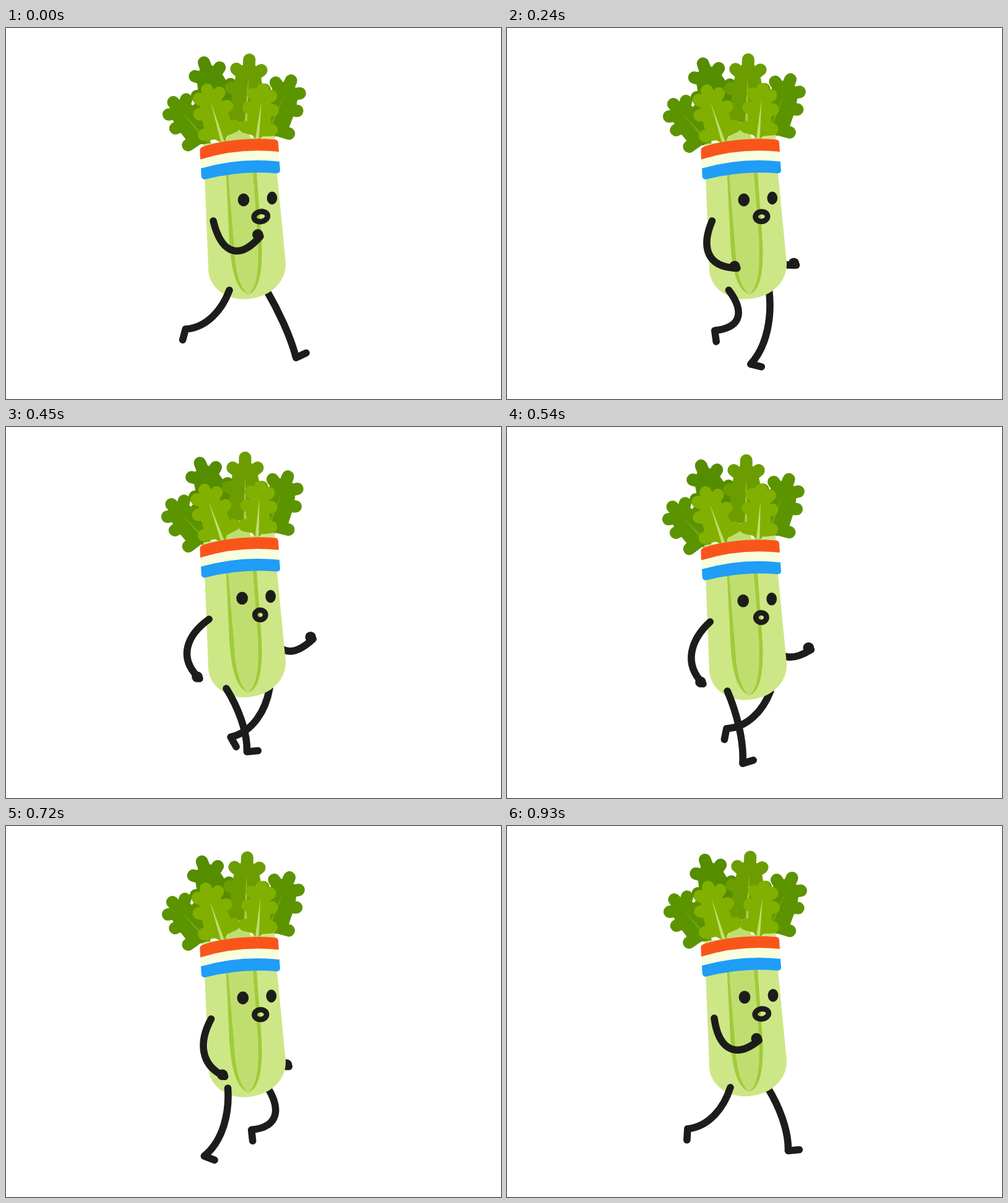
Write an HTML page that moves like this. It is 800 px wide and 600 px high and loops after 0.96 s.

```html
<!DOCTYPE html>
<html lang="en">
<head>
<meta charset="utf-8">
<title>Walking celery</title>
<style>
  html, body { margin: 0; width: 100%; height: 100%; overflow: hidden; background: #fff; }
  svg { display: block; width: 100%; height: 100%; }
  .limb { fill: none; stroke: #1c1d1a; stroke-width: 11.6; stroke-linecap: round; stroke-linejoin: round; }
  .lobes { stroke-width: 20; stroke-linecap: round; }
</style>
</head>
<body>
<svg viewBox="0 0 800 600">
  <g id="far"></g>
  <g id="body">
    <g id="backLeaves"></g>
    <path fill="#cde786" d="M319 188L434 172 438 235 452 380C453 413 424 438 384 438.5 350 438 327 415 327 390Z"/>
    <path fill="#a0cb3a" d="M353 180L361 345C364 392 371 422 391 431 411 425 415 388 413 345L405 233 400 180Z"/>
    <path fill="#c0de70" d="M359 238L356 180 366 162Q376 144 390 160L396 180 399 233 407.5 345C409 395 405 421 391 431 376 417 370 390 368 345Z"/>
    <g id="frontLeaves"></g>
    <path fill="#f9551b" d="M314 213L313.4 198Q313 194 318 192C350 181 400 177 435 180.5Q440 181 440 186L441 201Z"/>
    <path fill="#f8fedd" d="M314 212.5Q376 193 440.8 200L442 217 315 228Z"/>
    <path fill="#1f9df7" d="M315 227Q378 209 441.8 216L443 230Q443 235 437 235 380 230 323 244.5 316 246 315.6 239Z"/>
    <g id="eyes" fill="#1c1d1a">
      <ellipse cx="384" cy="278" rx="9.4" ry="10.4"/>
      <ellipse cx="430" cy="275" rx="8.4" ry="10.4"/>
    </g>
    <ellipse id="mouth" fill="none" stroke="#1c1d1a" stroke-width="8.8"/>
  </g>
  <g id="near"></g>
</svg>
<script>
const LOOP = 960;
const $ = id => document.getElementById(id);
const turn = time => time / LOOP * 2 * Math.PI;
const ease = u => u * u * (3 - 2 * u);
const clamp = u => Math.min(1, Math.max(0, u));

function add(parent, tag, attrs) {
  const el = document.createElementNS('http://www.w3.org/2000/svg', tag);
  for (const name in attrs) el.setAttribute(name, attrs[name]);
  return parent.appendChild(el);
}

// A leaf grows upwards from its base: one tip lobe and three pairs of side lobes.
function leaf(parent, color, x, y, angle, length, width, veinColor) {
  const g = add(parent, 'g', { transform: `translate(${x} ${y}) rotate(${angle})`, fill: color });
  const pairs = [[0.8, 0.155], [0.56, 0.21], [0.22, 0.23]]
    .map(([up, out]) => [out * length * width, -up * length]);
  const tip = [0, 10 - length];
  const left = pairs.map(([px, py]) => [-px, py]).reverse();
  const lobes = [...left, tip, ...pairs];
  const rays = lobes.map(([px, py]) => `M0 ${py * 0.85}L${px} ${py}`).join('');
  const core = lobes.map(([px, py]) => [px * 0.9, py]);
  add(g, 'path', { d: `M0 0L${core.join('L')}Z` });
  add(g, 'path', { d: rays, class: 'lobes', stroke: color });
  if (veinColor) add(g, 'path', { d: `M-3 0L0 ${-0.7 * length}L3 0Z`, fill: veinColor });
}

const back = $('backLeaves'), front = $('frontLeaves');
leaf(back, '#558d00', 360, 169, -19.5, 130, 1.05);
leaf(back, '#5c9400', 329.5, 188, -41, 100, 1.2, '#71a517');
leaf(back, '#5c9400', 418, 181, 24, 115, 1.2, '#71a517');
leaf(back, '#6b9d00', 387, 171, 3, 130, 1, '#a5cb48');
leaf(front, '#82b000', 351, 187, -16.5, 101, 1.1, '#c0de70');
leaf(front, '#82b000', 405.5, 183, 6.5, 94, 1, '#c0de70');

// Key poses of one stride: time, end x, end y, bend and, for legs, toe angle.
const legPoses = [
  [0, 290, 487, 18.5, 105],
  [150, 324, 493, 32, 87],
  [330, 349, 490, 37, 69],
  [450, 389, 525, 10, -5],
  [480, 404, 533, 5, -25],
  [630, 343, 552, 15, 3],
  [810, 304, 510, 20, 43],
  [930, 292, 490, 19, 93]
];
const armPoses = [
  [0, 411, 337, -47],
  [150, 396, 374, -42],
  [330, 345, 399, -37],
  [450, 313, 407, -36],
  [630, 331, 418, -29],
  [810, 379, 385, -36],
  [930, 407, 347, -43]
];

// The far limbs repeat the stride half a loop later: the leg lingers behind, the arm leads.
const lateLeg = time => time - 75 * ease(clamp((Math.cos(turn(time)) + 0.6) / 1.2));
const earlyArm = time => time + 50 - 45 * Math.sin(turn(time));

function limb(layer, poses, root, sway, shift = 0, timing) {
  const g = add($(layer), 'g', { transform: `translate(${shift} 0)` });
  const path = add(g, 'path', { class: 'limb' });
  const fist = poses === armPoses && add(g, 'circle', { r: 8.8, fill: '#1c1d1a' });
  return { poses, root, sway, timing, path, fist };
}
const limbs = [
  limb('far', armPoses, [331.5, 312], 3.5, 87, earlyArm),
  limb('far', legPoses, [358.5, 424], 2.5, 65, lateLeg),
  limb('near', legPoses, [358.5, 424], 2.5),
  limb('near', armPoses, [331.5, 312], 3.5)
];

// Smooth periodic curve through the key poses.
function poseAt(poses, time) {
  const n = poses.length;
  time = (time + LOOP) % LOOP;
  const i = poses.findLastIndex(([key]) => key <= time);
  const at = k => {
    const [key, ...values] = poses[(k + n) % n];
    return [key + Math.floor(k / n) * LOOP, values];
  };
  const [[t0, p0], [t1, p1], [t2, p2], [t3, p3]] = [i - 1, i, i + 1, i + 2].map(at);
  const span = t2 - t1, u = (time - t1) / span;
  return p1.map((a, j) => {
    const b = p2[j];
    const v1 = (b - p0[j]) / (t2 - t0) * span;
    const v2 = (p3[j] - a) / (t3 - t1) * span;
    return a + u * (v1 + u * (3 * (b - a) - 2 * v1 - v2 + u * (2 * (a - b) + v1 + v2)));
  });
}

// Down, pass, up, contact: eased quarter steps, twice per loop.
function bounce(time) {
  const heights = [0, 6, 0, -7.7];
  const i = Math.floor(time / 120);
  const from = heights[i % 4], to = heights[(i + 1) % 4];
  return from + (to - from) * ease(time / 120 - i);
}

function drawLimb({ poses, root, sway, timing, path, fist }, time, dy) {
  const phase = timing ? (time + LOOP / 2) % LOOP : time;
  const [ex, ey, bend, toe] = poseAt(poses, timing ? timing(phase) : phase);
  const x = root[0] + sway * Math.cos(turn(phase)), y = root[1] + dy;
  const dx = ex - x, down = ey - y, length = Math.hypot(dx, down);
  const handle = (along, out) =>
    `${x + dx * along + down / length * out} ${y + down * along - dx / length * out}`;
  let d = `M${x} ${y}C${handle(0.31, bend * 0.85)} ${handle(0.71, bend * 1.15)} ${ex} ${ey}`;
  if (fist) {
    fist.setAttribute('cx', ex - 4);
    fist.setAttribute('cy', ey - 3);
  } else {
    const angle = toe * Math.PI / 180;
    d += `l${18 * Math.cos(angle)} ${18 * Math.sin(angle)}`;
  }
  path.setAttribute('d', d);
}

function draw(now) {
  const time = now % LOOP;
  const swing = Math.cos(turn(time));
  const dy = bounce(time);

  $('body').setAttribute('transform', `translate(0 ${dy})`);
  for (const g of [back, front]) g.setAttribute('transform', `rotate(${(swing - 1) * 1.5} 385 183)`);
  $('eyes').setAttribute('transform', `translate(${(swing - 1) * 1.2} 0)`);

  const mouth = $('mouth');
  mouth.setAttribute('rx', 9.8 + 1.3 * swing);
  mouth.setAttribute('ry', 7.9 + 0.2 * swing);
  mouth.setAttribute('transform', `translate(${411.3 + swing * 0.5} 305) rotate(${-6 - 4 * swing})`);

  for (const part of limbs) drawLimb(part, time, dy);
}

const start = performance.now();
(function tick() {
  draw(performance.now() - start);
  requestAnimationFrame(tick);
})();
</script>
</body>
</html>
```
